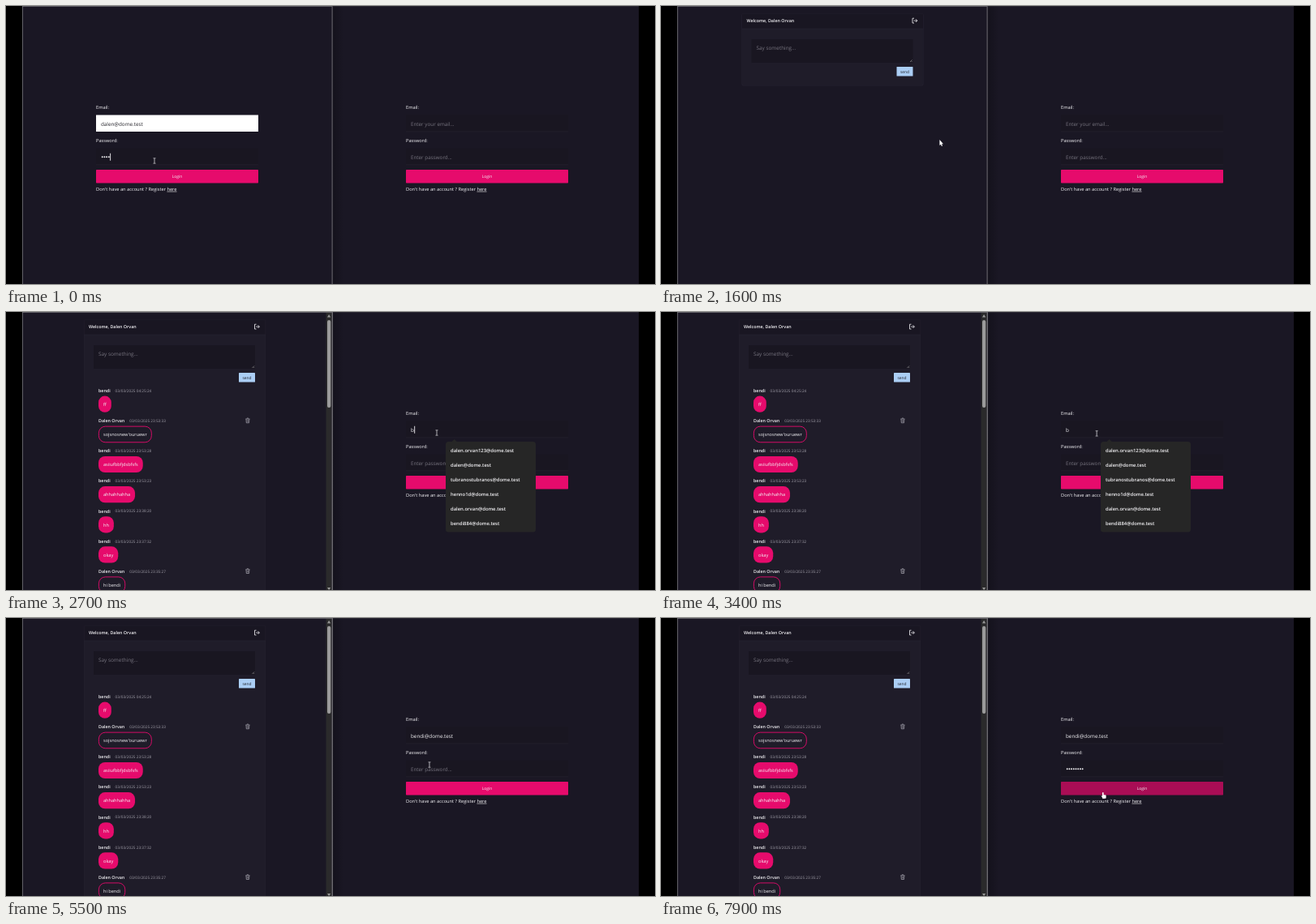
These frames come from a looping animation (800 px wide and 343 px high, 8000 ms). An HTML page with a canvas:

```html
<!DOCTYPE html>
<html lang="en">
<head>
<meta charset="utf-8">
<title>Two chat windows</title>
<style>
  html, body { margin: 0; width: 100%; height: 100%; overflow: hidden; background: #000; }
  canvas { display: block; }
</style>
</head>
<body>
<canvas id="stage" width="800" height="343"></canvas>
<script>
const ctx = document.getElementById('stage').getContext('2d');
ctx.textRendering = 'geometricPrecision';

const LOOP = 8000, STEP = 100;
const BG = '#1a1724', FIELD = '#191621', PANEL = '#1f1c29', EDGE = '#252230';
const PINK = '#e60b6c', PINK_HOVER = '#a90d55', MUTED = '#77747f', WHITE = '#f4f3f6';
const LOGIN_AT = 1000, MESSAGES_AT = 1700, FOCUS_AT = 2200, POPUP_AT = 2600, FILL_AT = 3650;
const ME = 'Dalen Orvan', FRIEND = 'bendi', HOST = '@dome.test';

const messages = [
  [FRIEND, '04:25:24', 'ff'],
  [ME, '23:53:33', "sojsnosnew'ouruewr"],
  [FRIEND, '23:53:28', 'asiiufbbfjdsbfsfs'],
  [FRIEND, '23:53:23', 'ahhahhahha'],
  [FRIEND, '23:38:20', 'hh'],
  [FRIEND, '23:37:32', 'okay'],
  [ME, '23:35:27', 'hi ' + FRIEND]
];
const suggestions = ['dalen.orvan123', 'dalen', 'tubranostubranos', 'henno1d', 'dalen.orvan', FRIEND + '884'];

// Pointer path: time, x, y
const path = [
  [0, 183, 191], [400, 183, 191], [700, 232, 212], [950, 232, 212], [1500, 344, 169],
  [1700, 344, 169], [2200, 531, 149], [2700, 531, 149], [3600, 538, 150], [4900, 538, 150],
  [5400, 522, 181], [6600, 521, 183], [7200, 544, 214], [7500, 545, 219], [8000, 545, 219]
];

function rect(x, y, w, h, fill, r = 0) {
  ctx.fillStyle = fill;
  ctx.beginPath();
  ctx.roundRect(x, y, w, h, r);
  ctx.fill();
}

function line(points, color, width = 1) {
  ctx.strokeStyle = color;
  ctx.lineWidth = width;
  ctx.beginPath();
  points.forEach(([x, y], i) => i ? ctx.lineTo(x, y) : ctx.moveTo(x, y));
  ctx.stroke();
}

function shape(points, fill) {
  ctx.fillStyle = fill;
  ctx.beginPath();
  points.forEach(([x, y]) => ctx.lineTo(x, y));
  ctx.closePath();
  ctx.fill();
}

// Draws vertically centred text and returns its width.
function text(str, x, y, size, color = WHITE, weight = 400, align = 'left') {
  ctx.font = `${weight} ${size}px "Open Sans", "Noto Sans", sans-serif`;
  ctx.textAlign = align;
  ctx.fillStyle = color;
  ctx.fillText(str, x, y + size * 0.36);
  return ctx.measureText(str).width;
}

function caret(x, y, color, idle) {
  if (Math.floor(idle / 500) % 2 === 0) rect(x + 0.4, y - 4.5, 0.9, 9, color);
}

function input(x, y, { value = '', hint = '', filled, dots = 0, idle = -1, caretAt }) {
  rect(x, y, 200, 20.5, filled ? '#fff' : FIELD);
  if (!filled) rect(x, y + 20, 200, 0.8, '#24212e');
  const mid = y + 10.8, ink = filled ? '#25242b' : WHITE;
  let end = 0;
  if (dots) {
    for (let i = 0; i < dots; i++) {
      ctx.fillStyle = WHITE;
      ctx.beginPath();
      ctx.arc(x + 7.7 + i * 2.7, mid, 0.95, 0, 7);
      ctx.fill();
    }
    end = dots * 2.7;
  } else if (value) {
    end = text(value, x + 6, mid, 6.3, ink);
    if (caretAt !== undefined) end = ctx.measureText(value.slice(0, caretAt)).width;
  } else {
    text(hint, x + 6, mid, 6.3, MUTED);
  }
  if (idle >= 0) caret(x + 6 + end, mid, ink, idle);
}

function form(x, email, password, hover) {
  text('Email:', x, 124.5, 5.7);
  input(x, 134.5, { hint: 'Enter your email...', ...email });
  text('Password:', x, 165.5, 5.65);
  input(x, 175.5, { hint: 'Enter password...', ...password });
  rect(x, 202, 200, 16.5, hover ? PINK_HOVER : PINK, 0.8);
  text('Login', x + 100, 210.5, 5, WHITE, 400, 'center');
  const w = text("Don't have an account ? Register ", x, 226, 5.7);
  const link = text('here', x + w, 226, 5.7);
  rect(x + w, 228.7, link, 0.6, WHITE);
}

function trash(x, y) {
  const color = '#aaa8b2';
  line([[x, y + 1.3], [x + 5.4, y + 1.3]], color, 0.7);
  line([[x + 1.8, y + 1], [x + 1.8, y + 0.2], [x + 3.6, y + 0.2], [x + 3.6, y + 1]], color, 0.6);
  line([[x + 0.8, y + 1.5], [x + 1.1, y + 6], [x + 4.3, y + 6], [x + 4.6, y + 1.5]], color, 0.7);
  line([[x + 2.1, y + 2.5], [x + 2.1, y + 5]], color, 0.5);
  line([[x + 3.3, y + 2.5], [x + 3.3, y + 5]], color, 0.5);
}

function bubble([name, clock, body], i) {
  const y = 97 + i * 37.15, mine = name === ME;
  const w = text(name, 114, y, 5.35, WHITE, 600);
  text('03/03/2025 ' + clock, 114 + w + 6, y + 0.2, 4.7, '#a09ea8');
  ctx.font = '5.6px "Open Sans", "Noto Sans", sans-serif';
  const width = ctx.measureText(body).width + 12;
  if (mine) {
    ctx.strokeStyle = PINK;
    ctx.lineWidth = 0.9;
    ctx.beginPath();
    ctx.roundRect(114.4, y + 7, width - 0.8, 19.6, 8);
    ctx.stroke();
    trash(295.2, y - 3.4);
  } else {
    rect(114, y + 6.6, width, 20.2, PINK, 8);
  }
  text(body, 120, y + 17, 5.6);
}

function scrollbar() {
  rect(394.5, 0.5, 7, 343, '#2a2a2b');
  rect(396, 10, 4.3, 108, '#9b9b9b', 2.1);
  shape([[396, 6.5], [398.1, 3], [400.2, 6.5]], '#9b9b9b');
  shape([[396, 340], [398.1, 343], [400.2, 340]], '#9b9b9b');
}

function chat(loaded) {
  const x = loaded ? 96 : 99.5;
  const bottom = loaded ? 360 : 98.5;
  rect(x, 9, 224, bottom - 9, EDGE, 2);
  rect(x + 0.6, 9.6, 222.8, bottom - 10.2, PANEL, 2);
  rect(x + 0.6, 9.6, 222.8, 18.4, '#191622');
  rect(x, 27.8, 224, 0.6, EDGE);
  text('Welcome, ' + ME, x + 6, 18.5, 5.35, WHITE, 600);

  const ix = x + 210;
  line([[ix + 2.5, 15.2], [ix + 0.5, 15.2], [ix + 0.5, 21], [ix + 2.5, 21]], WHITE, 0.8);
  line([[ix + 2.2, 18.1], [ix + 6.2, 18.1]], WHITE, 0.8);
  line([[ix + 4.6, 16.3], [ix + 6.4, 18.1], [ix + 4.6, 19.9]], WHITE, 0.8);

  rect(x + 12, 41, 199, 29, '#191621');
  text('Say something...', x + 18, 51.5, 6.4, MUTED);
  line([[x + 207.5, 69], [x + 210, 66.5]], '#aaa', 0.6);
  line([[x + 209.2, 69], [x + 210, 68.2]], '#aaa', 0.6);
  rect(x + 191, 75, 20, 11.5, '#abcef5', 0.6);
  text('send', x + 201, 81, 4.9, '#20232c', 400, 'center');

  if (loaded) {
    messages.forEach(bubble);
    scrollbar();
  }
}

function popup() {
  shape([[549, 160.5], [552.7, 157], [556.4, 160.5]], '#262626');
  rect(542, 160, 111, 111.5, '#262626', 3.5);
  suggestions.forEach((s, i) => text(s + HOST, 548, 171 + i * 17.9, 5.9, WHITE, 600));
}

function pointerAt(t) {
  const i = path.findIndex(p => p[0] > t);
  const [t0, x0, y0] = path[i - 1], [t1, x1, y1] = path[i];
  const k = (t - t0) / (t1 - t0), e = k * k * (3 - 2 * k);
  return [x0 + (x1 - x0) * e, y0 + (y1 - y0) * e];
}

function pointer(x, y, kind, color) {
  if (kind === 'beam') {
    line([[x, y - 3], [x, y + 3]], color, 0.8);
    line([[x - 1.5, y - 3.2], [x + 1.5, y - 3.2]], color, 0.7);
    line([[x - 1.5, y + 3.2], [x + 1.5, y + 3.2]], color, 0.7);
  } else if (kind === 'hand') {
    rect(x - 1, y - 4, 1.6, 6, '#fff', 0.8);
    rect(x - 1, y - 0.8, 4.6, 4.6, '#fff', 1.2);
    shape([[x - 2.5, y + 0.2], [x - 1, y + 0.6], [x + 0.5, y + 3.8], [x - 0.3, y + 3.8]], '#fff');
  } else {
    const tip = [[0, -4], [0, 3], [1.5, 1.7], [2.5, 4], [3.6, 3.5], [2.6, 1.3], [4.6, 1.2]];
    shape(tip.map(([dx, dy]) => [x - 0.6 + dx, y + dy]), '#fff');
  }
}

function rightEmail(t) {
  if (t < FOCUS_AT) return {};
  if (t < FILL_AT) {
    const typed = t >= 2500;
    return { value: typed ? FRIEND[0] : '', idle: t - (typed ? 2500 : FOCUS_AT) };
  }
  const edits = [4700, 4900, 5000].filter(at => t >= at);
  const user = FRIEND + '884'.slice(0, 3 - edits.length);
  return {
    value: user + HOST,
    filled: !edits.length,
    idle: t < 5600 ? t - (edits.at(-1) ?? FILL_AT) : -1,
    caretAt: t >= 4500 ? user.length : undefined
  };
}

function rightPassword(t) {
  if (t < 5600) return {};
  const dots = Math.max(0, Math.min(8, Math.floor((t - 5700) / 100)));
  return { dots, idle: t < 7500 ? t - Math.min(t, 6500) : -1 };
}

function draw(t) {
  rect(0, 0, 800, 343, '#000');
  rect(20, 0, 760, 343, BG);
  const shade = ctx.createLinearGradient(403, 0, 416, 0);
  shade.addColorStop(0, '#14121c');
  shade.addColorStop(1, BG);
  rect(403, 0, 13, 343, shade);

  const [x, y] = pointerAt(t);
  const left = x < 402;
  const fx = left ? 111 : 493;
  const hasForm = !left || t < LOGIN_AT;
  const inX = hasForm && x >= fx && x <= fx + 200;
  const onButton = inX && y >= 202 && y <= 219.5;
  const onEmail = inX && y >= 134 && y <= 155;
  const onField = onEmail || (inX && y >= 175 && y <= 196);

  if (t < LOGIN_AT) {
    const dots = Math.min(8, 4 + Math.floor(t / 100));
    form(111, { value: 'dalen' + HOST, filled: true },
      { dots, idle: t < 800 ? t - Math.min(t, 400) : -1 }, left && onButton);
  } else {
    chat(t >= MESSAGES_AT);
  }
  const email = rightEmail(t);
  form(493, email, rightPassword(t), !left && onButton);
  if (t >= POPUP_AT && t < FILL_AT) popup();

  rect(20, 0, 382, 0.8, '#77767b');
  rect(403, 0, 377, 0.6, '#3a3841');
  rect(20, 0, 0.8, 343, '#77767b');
  rect(401.6, 0, t >= FOCUS_AT ? 1.4 : 1, 343, '#6d6c71');

  const kind = onButton ? 'hand' : onField ? 'beam' : 'arrow';
  pointer(x, y, kind, onEmail && email.filled ? '#66727f' : '#d5d4d8');
}

function frame(now) {
  draw(Math.floor(now % LOOP / STEP) * STEP);
  requestAnimationFrame(frame);
}
requestAnimationFrame(frame);
</script>
</body>
</html>
```
